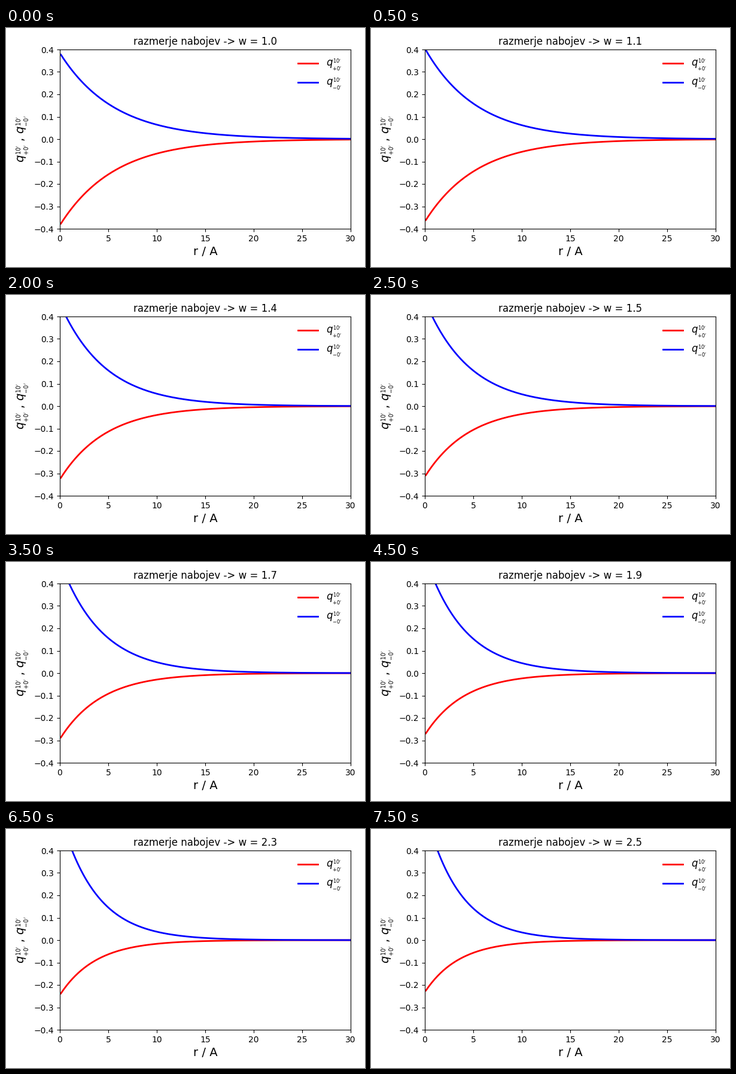
These frames come from a looping animation (600x400 px, 8 s). A matplotlib script:

```python
import numpy as np
import matplotlib.pyplot as plt
from matplotlib.animation import FuncAnimation

FRAMES = 16
INTERVAL = 500
KAPPA = 0.1785  # inverse screening length at w = 1

plt.rcParams["font.family"] = "DejaVu Sans"

Q_PLUS = r"$q_{_{+0'}}^{_{10'}}$"
Q_MINUS = r"$q_{_{-0'}}^{_{10'}}$"

r = np.linspace(0.1, 30, 300)


def decay(w):
    """Screened charge profile for the charge ratio w."""
    return np.exp(-KAPPA * np.sqrt(w) * r) / (1.462 + 1.14 * w)


fig = plt.figure(figsize=(6, 4), dpi=100)
ax = fig.add_axes([0.15, 0.16, 0.81, 0.75])
ax.set_xlim(0, 30)
ax.set_ylim(-0.4, 0.4)
ax.set_xlabel("r / A", fontsize=14)
ax.set_ylabel(f"{Q_PLUS} , {Q_MINUS}", fontsize=14)
title = ax.set_title("", fontsize=12)

plus, = ax.plot([], [], color="red", lw=2, label=Q_PLUS)
minus, = ax.plot([], [], color="blue", lw=2, label=Q_MINUS)
ax.legend(loc="upper right", fontsize=12, frameon=False)


def update(i):
    w = 1 + 0.1 * i
    q = decay(w)
    plus.set_data(r, -q)
    minus.set_data(r, w * q)
    title.set_text(f"razmerje nabojev -> w = {w:.1f}")
    return plus, minus, title


anim = FuncAnimation(fig, update, frames=FRAMES, interval=INTERVAL,
                     repeat=True, repeat_delay=0, blit=False)
plt.show()
```
